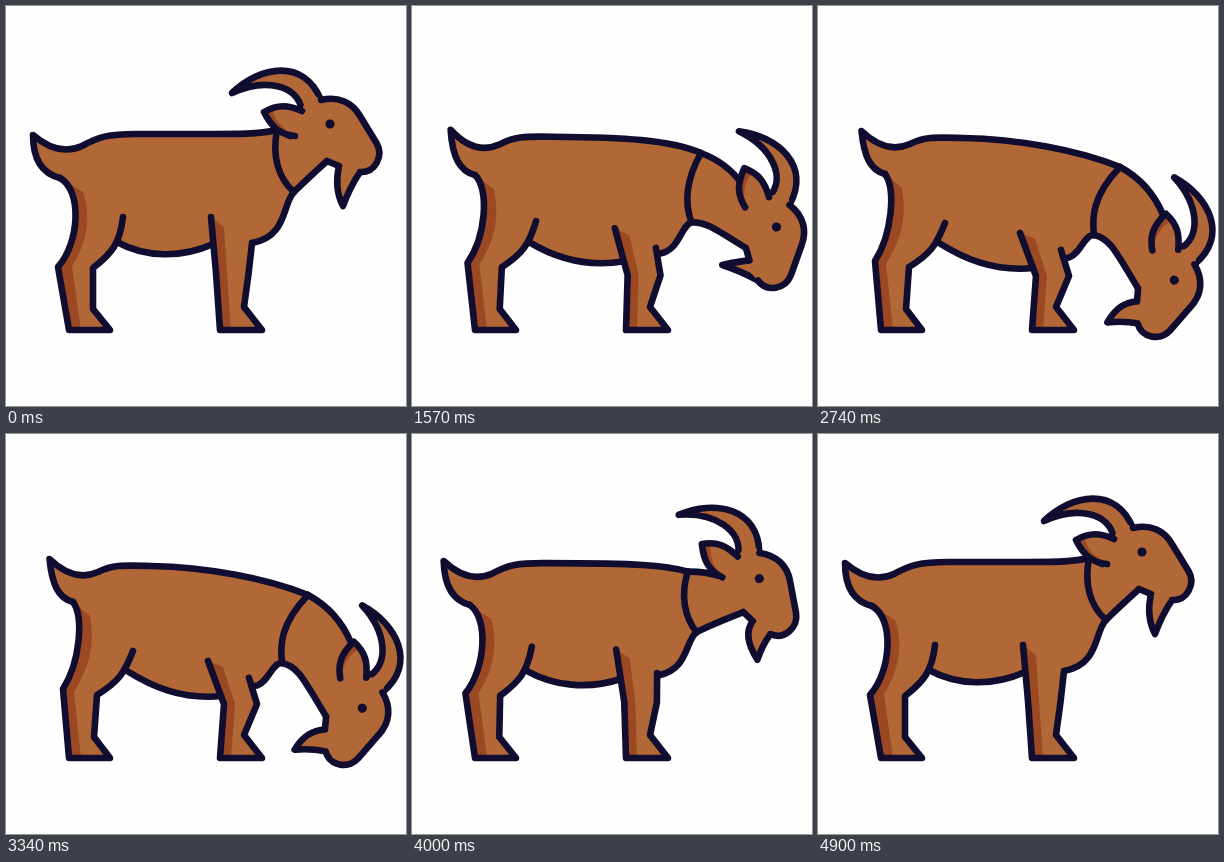
An HTML page that plays this animation: 400x400 px, repeating every 4930 ms.

```html
<!DOCTYPE html>
<html lang="en">
<head>
<meta charset="utf-8">
<title>Grazing goat</title>
<style>
  html, body { margin: 0; width: 100%; height: 100%; overflow: hidden; background: #fefefe; }
  svg { display: block; width: 100vw; height: 100vh; }
  path { fill: none; }
  .fill { fill: #b26836; }
  .shade { fill: #9a4923; }
  .line { stroke: #100d30; stroke-width: 6.6; stroke-linecap: round; stroke-linejoin: round; }
</style>
</head>
<body>
<svg viewBox="0 0 400 400">
  <path id="torso" class="fill"/>
  <path id="hindFill" class="fill"/>
  <path id="hindShade" class="shade"/>
  <path id="back" class="line"/>
  <path id="belly" class="line"/>
  <path id="hind" class="line"/>
  <path id="chest" class="line"/>
  <path id="front" class="fill"/>
  <path id="frontShade" class="shade"/>
  <path id="frontLine" class="line"/>
  <path id="neck" class="fill"/>
  <path id="nape" class="line"/>
  <path id="throat" class="line"/>
  <path id="collar" class="line"/>
  <g id="head">
    <path id="beard" class="fill line"/>
    <path class="fill line" d="M-28 -13C-32 -40 -66 -46 -98 -31C-70 -58 -26 -66 -9 -24"/>
    <path class="fill" d="M-28 -13L-25 -23L-15 -28L-9 -24C8 -28 22 -22 30 -8L46.5 19C54 32 45 49 30 48L17 49L9 42L-3 37Z"/>
    <path class="line" d="M-9 -24C8 -28 22 -22 30 -8L46.5 19C54 32 45 49 30 48M9 42L-3 37"/>
    <path class="fill" d="M-35 12C-50 10 -58 4 -66 -12C-52 -20 -42 -19 -28 -13Z"/>
    <path class="shade" d="M-35 12C-50 10 -58 4 -66 -12L-57 -13Q-54 1 -35 12Z"/>
    <path class="line" d="M-35 12C-50 10 -58 4 -66 -12C-52 -20 -42 -19 -28 -13"/>
    <circle r="4.6" fill="#100d30"/>
  </g>
</svg>
<script>
const LOOP = 4930;
const parts = {};
document.querySelectorAll('[id]').forEach(el => parts[el.id] = el);

const draw = (id, d) => parts[id].setAttribute('d', d);
const clamp = x => Math.min(1, Math.max(0, x));
const ease = x => (1 - Math.cos(Math.PI * clamp(x))) / 2;
const ramp = (t, from, to) => ease((t - from) / (to - from));

// Eased value of a keyed track: [[time, ...values], ...]
function track(keys, t) {
  let i = 0;
  while (i < keys.length - 2 && t >= keys[i + 1][0]) i++;
  const [t0, ...a] = keys[i], [t1, ...b] = keys[i + 1];
  const k = ramp(t, t0, t1);
  return a.map((v, n) => v + (b[n] - v) * k);
}

// Blend two path strings that have the same commands.
const NUMBER = /-?\d+(\.\d+)?/g;
function blend(a, b, k) {
  const ends = b.match(NUMBER);
  let i = 0;
  return a.replace(NUMBER, n => (+n + (ends[i++] - n) * k).toFixed(2));
}

const headKeys = [[0, 0], [1000, 0], [1900, 1], [3637, 1], [4260, -.13], [4900, 0], [LOOP, 0]];
const bodyKeys = [[0, 0], [1000, 0], [1900, 1], [3460, 1], [4300, 0], [LOOP, 0]];
const beardKeys = [[0, 13, 82], [1030, 13, 82], [1570, -4.5, 66], [2140, 21, 76], [3340, 19, 77],
  [4000, 27, 76.5], [4900, 13, 82], [LOOP, 13, 82]];

// Eye position along the swing from standing to grazing
const eyeNodes = [[0, 324, 118], [.29, 347.5, 145], [.71, 364.5, 222], [1, 356.3, 274.2]];
function eyeAt(q) {
  if (q < 0) return [324 + 80 * q, 118 + 90 * q];
  return [1, 2].map(axis => eyeNodes.reduce((sum, node) => {
    const weight = eyeNodes.reduce((w, other) =>
      other === node ? w : w * (q - other[0]) / (node[0] - other[0]), 1);
    return sum + weight * node[axis];
  }, 0));
}

function render(t) {
  const [q] = track(headKeys, t), [p] = track(bodyKeys, t);
  const mix = (a, b) => blend(a, b, p);
  const grazing = ramp(t, 1750, 2000) * (1 - ramp(t, 3450, 3650));
  const bob = grazing * Math.sin((t - 2140) / 600 * 2 * Math.PI);
  const wag = 3 * bob * bob;

  // Body
  const sag = p * (1 - p);
  const top = `${271 + 31 * p - 19 * sag} ${124 + 37 * p + 36 * sag * (1 - 2 * p)}`;
  const bottom = mix('288 186', '276 229');
  const back = mix('M54 172C38 168 27 155 27 129C42 142 58 148 76 140C92 131 102 128 130 128C235 128 250 129',
    `M67 168C52 164 46 150 43.5 ${125 - wag - 16 * sag}C58 139 74 146 92 138C106 131 115 131 145 132C200 133 260 ${144 - 42 * sag}`) + ' ' + top;
  const collar = mix('C266 150 272 172', 'C274 190 274 212') + ' ' + bottom;
  const chest = mix('C276 198 282 230 246 237', 'C266 228 262 250 249 252');
  const belly = mix('207 238C176 252 140 252 111 236', '216 262C175 266 145 252 121 237');
  draw('torso', back + collar + chest + 'L' + belly + 'Z');
  draw('back', back);
  draw('collar', 'M' + top + collar);
  draw('chest', 'M' + bottom + chest);
  draw('belly', 'M' + belly);

  // Legs
  const rump = mix('M54 172C76 184 74 236 52 261', 'M67 168C78 183 74 228 57 255') + 'L63 324';
  const hind = rump + mix('L104 324L87 303L87 262C105 248 114 238 117 211',
    'L104 324L88 303L91 261C112 248 118 240 127 217');
  draw('hindFill', hind + 'Z');
  draw('hind', hind);
  draw('hindShade', rump + mix('L75 324L66 260C84 232 84 205 77 186Z', 'L75 324L68 258C86 228 88 210 84 182Z'));
  const shin = mix('M205 211L210 267L214 324', 'M202 227L218 270L214 324');
  const front = shin + mix('L256 324L238 301L242.5 268L246 237', 'L256 324L238 301L251 270L243 244');
  draw('front', front + 'Z');
  draw('frontLine', front);
  draw('frontShade', shin + mix('L225 324L221 267L218 221Z', 'L225 324L229 270L217 233Z'));

  // Head
  const angle = 72.4 * q + 1.2 * bob;
  const [eyeX, eyeY0] = eyeAt(q), eyeY = eyeY0 + 2 * bob;
  const cos = Math.cos(angle * Math.PI / 180), sin = Math.sin(angle * Math.PI / 180);
  const onHead = (x, y) => [eyeX + x * cos - y * sin, eyeY + x * sin + y * cos];
  parts.head.setAttribute('transform', `translate(${eyeX} ${eyeY}) rotate(${angle})`);
  const [tipX, tipY] = track(beardKeys, t);
  draw('beard', `M9 42Q4 ${tipY - 17} ${tipX} ${tipY}Q${(tipX + 30) / 2 - 2} ${(tipY + 48) / 2 - 1} 30 48`);

  // Neck, joining body and head
  const lean = Math.max(0, (q - .29) / .71);
  const napeEnd = onHead(-40 - 26 * lean, 12 - 21 * lean);
  const [topX, topY] = top.split(' ').map(Number);
  const bend = [(topX + napeEnd[0]) / 2 + 8 * p, (topY + napeEnd[1]) / 2 - 8 * p];
  const nape = `M${top}Q${bend} ${napeEnd}`;
  const mouth = onHead(-3, 37);
  const throat = mix('C297 177 310 165', 'C292 232 298 246') + ' ' + mouth;
  const throatBack = mix('C310 165 297 177', 'C298 246 292 232') + ' ' + bottom;
  const collarBack = mix('C272 172 266 150', 'C274 212 274 190') + ' ' + top;
  draw('neck', `${nape}L${onHead(-28, -13)}L${onHead(0, 0)}L${mouth}${throatBack}${collarBack}Z`);
  draw('nape', nape);
  draw('throat', 'M' + bottom + throat);
}

const start = performance.now();
function tick() {
  render((performance.now() - start) % LOOP);
  requestAnimationFrame(tick);
}
render(0);
requestAnimationFrame(tick);
</script>
</body>
</html>
```
